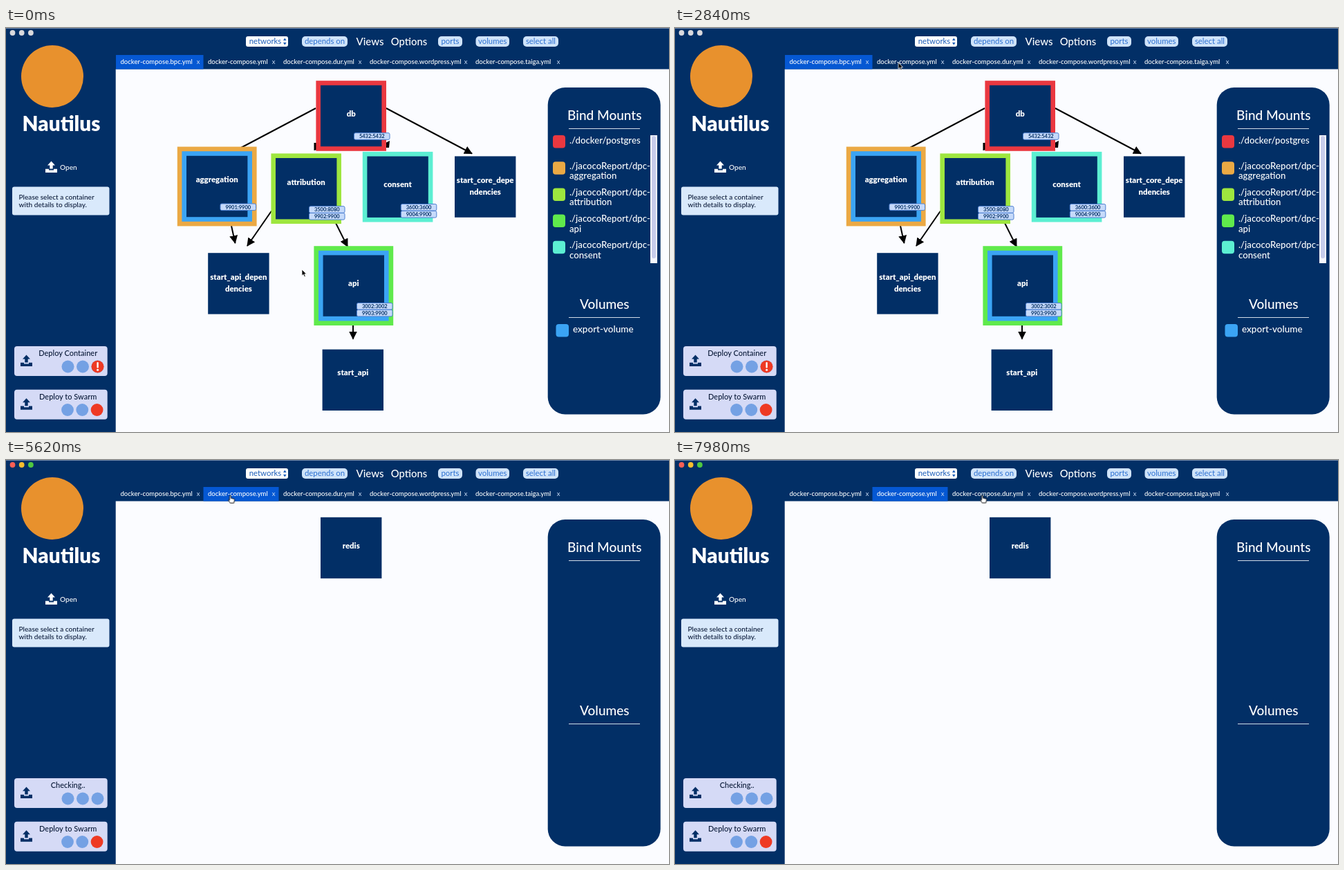
Write an HTML page that moves like this. It is 959 by 584 pixels and loops after 8 s.

```html
<!DOCTYPE html>
<html lang="en">
<head>
<meta charset="utf-8">
<title>Compose viewer</title>
<style>
  html, body { margin: 0; width: 100%; height: 100%; overflow: hidden; background: #fbfcff; }
  svg { display: block; width: 959px; height: 584px; font-family: Lato, "Open Sans", sans-serif; }
  text { white-space: pre; }
</style>
</head>
<body>
<svg id="stage" viewBox="0 0 959 584">
  <defs>
    <marker id="head" markerUnits="userSpaceOnUse" markerWidth="13" markerHeight="13" refX="11" refY="6" orient="auto">
      <path d="M0 0L12 6L0 12z"/>
    </marker>
  </defs>
</svg>
<script>
const LOOP = 8000, TAB_SWITCH = 5060, GRAPH_SWITCH = 5100, FOCUS = 3500;
const NAVY = '#022f66', INK = '#0a1a38', WHITE = '#fff', RED = '#ea3840', ORANGE = '#eba944', LIME = '#9ee63f',
  GREEN = '#60ea4c', AQUA = '#5cefd2', BLUE = '#3ba4f4', ALERT = '#ee3a24', IDLE = '#74a1e4';
const stage = document.getElementById('stage');

function add(parent, tag, attrs = {}, content) {
  const el = document.createElementNS('http://www.w3.org/2000/svg', tag);
  for (const key in attrs) el.setAttribute(key, attrs[key]);
  if (content) el.textContent = content;
  return parent.appendChild(el);
}
const group = (parent = stage) => add(parent, 'g');
const rect = (p, x, y, width, height, fill, rx = 0, more = {}) =>
  add(p, 'rect', { x, y, width, height, fill, rx, ...more });
const dot = (p, cx, cy, r, fill) => add(p, 'circle', { cx, cy, r, fill });
const text = (p, x, y, size, content, fill = WHITE, weight = 500, anchor = 'start') =>
  add(p, 'text', { x, y, 'font-size': size, fill, 'font-weight': weight, 'text-anchor': anchor }, content);
const centered = (p, x, y, size, content, fill, weight) => text(p, x, y, size, content, fill, weight, 'middle');
const path = (p, d, attrs) => add(p, 'path', { d, ...attrs });

// Shows an element only inside the given [from, to) spans of the loop.
function showDuring(el, ...spans) {
  const visible = t => spans.some(([from, to]) => t >= from && t < to);
  const times = [...new Set([0, ...spans.flat(), LOOP])].sort((a, b) => a - b);
  el.animate(times.map(t => ({
    offset: t / LOOP, visibility: visible(t) ? 'visible' : 'hidden', easing: 'step-end'
  })), { duration: LOOP, iterations: Infinity });
}

// Window frame
rect(stage, 0, 0, 959, 584, '#fbfcff');
rect(stage, 0, 0, 158.7, 584, NAVY);
rect(stage, 158, 0, 801, 59.5, NAVY);
rect(stage, 0, 0, 959, 1, '#7088aa');

function lights(colors) {
  const g = group();
  colors.forEach((c, i) => dot(g, 9.5 + 13.2 * i, 7, 3.9, c));
  return g;
}
showDuring(lights(['#d9d9dd', '#d9d9dd', '#d9d9dd']), [0, FOCUS]);
showDuring(lights(['#f95f55', '#f9bd2e', '#4fc840']), [FOCUS, LOOP]);

// Sidebar
function uploadIcon(p, x, y, fill) {
  path(p, 'M8.5 0L14 6H10.7V11H6.3V6H3zM0 11.3H5V13H12V11.3H17V16.5H0z',
    { fill, transform: `translate(${x} ${y})` });
}
dot(stage, 67, 70, 45, '#e8912d');
centered(stage, 80, 148.5, 29.7, 'Nautilus', WHITE, 900);
uploadIcon(stage, 57, 192.5, WHITE);
text(stage, 78, 204.5, 10.1, 'Open');
rect(stage, 9, 229.5, 140.5, 41, '#d9e9fb', 3);
text(stage, 18.5, 247.5, 10.1, 'Please select a container', INK);
text(stage, 18.5, 258.8, 10.1, 'with details to display.', INK);

function deployButton(y) {
  rect(stage, 12, y, 134.7, 43, '#d5daf6', 4);
  uploadIcon(stage, 21, y + 12.5, NAVY);
}
deployButton(460);
deployButton(522.8);
const label = (p, y, content) => centered(p, 89.7, y, 11, content, INK);
for (const x of [89.5, 111, 132.5]) dot(stage, x, 489.5, 9, IDLE);
const ready = group(), checking = group();
label(ready, 474, 'Deploy Container');
dot(ready, 132.5, 489.5, 9, ALERT);
rect(ready, 131.4, 483, 2.4, 8.5, WHITE, 1);
dot(ready, 132.6, 494.3, 1.5, WHITE);
label(checking, 474, 'Checking..');
label(stage, 537, 'Deploy to Swarm');
[IDLE, IDLE, ALERT].forEach((c, i) => dot(stage, 89 + 21.3 * i, 552, 8.9, c));

// Toolbar
const toolbar = [[347, 61, 'networks', 375], [428, 66, 'depends on'], [625, 35, 'ports'],
  [679.5, 48.5, 'volumes'], [748, 51, 'select all']];
for (const [x, w, name, mid] of toolbar) {
  rect(stage, x, 12, w, 15, mid ? WHITE : '#cfe3fa', mid ? 3 : 5);
  centered(stage, mid || x + w / 2, 23, 11.4, name, mid ? '#1b5cb8' : '#2c70d0', 400);
}
path(stage, 'M401 18L403.3 14.5L405.6 18zM401 21L403.3 24.5L405.6 21z', { fill: '#1b5cb8' });
centered(stage, 526.5, 24.5, 15, 'Views');
centered(stage, 583, 24.5, 14.8, 'Options');

// Tabs
showDuring(rect(stage, 159, 39, 126.5, 20.5, '#0558d3'), [0, TAB_SWITCH]);
showDuring(rect(stage, 285.5, 39, 109, 20.5, '#0558d3'), [TAB_SWITCH, LOOP]);
const tabs = [[165.5, 278, '.bpc'], [292, 387, ''], [401, 512, '.dur'], [526, 665, '.wordpress'], [679, 799, '.taiga']];
for (const [x, close, name] of tabs) {
  text(stage, x, 52, 9.55, `docker-compose${name}.yml`);
  centered(stage, close, 52, 9.5, 'x', '#c6d8f2', 400);
}

// Graphs
const NODE = 88.4;
const graph = group(), single = group();
function arrow(x1, y1, x2, y2, head = true) {
  add(graph, 'line', { x1, y1, x2, y2, stroke: '#000', 'stroke-width': 2, ...(head && { 'marker-end': 'url(#head)' }) });
}
function node(p, x, y, lines, dy, rings = [], ports = []) {
  rings.forEach((color, i) => {
    const pad = 6.6 * (rings.length - i);
    rect(p, x - pad, y - pad, NODE + 2 * pad, NODE + 2 * pad, color);
  });
  rect(p, x, y, NODE, NODE, NAVY);
  lines.forEach((line, i) => centered(p, x + NODE / 2, y + dy + 17.3 * i, 11.4, line, WHITE, 900));
  ports.forEach(([px, py, port]) => {
    rect(p, px, py, 51.5, 9.6, '#c6dafa', 2, { stroke: '#4c7fd0', 'stroke-width': 1 });
    centered(p, px + 25.8, py + 7.6, 7.5, port, NAVY, 700);
  });
}
arrow(448, 116, 340, 173, false);
arrow(550, 116, 674, 181.5);
arrow(326, 286, 331.5, 311);
arrow(384, 264.5, 349, 315);
arrow(477, 282, 494, 316);
arrow(502, 430, 502, 449.5);
path(graph, 'M445.5 166H450V176L445.5 177zM549 166L555 163L554 173H549z', {});
node(graph, 455, 82.8, ['db'], 45.2, [RED], [[503.5, 151.7, '5432:5432']]);
node(graph, 261, 184.8, ['aggregation'], 38.4, [ORANGE, BLUE], [[310, 254, '9901:9900']]);
node(graph, 390, 188, ['attribution'], 38.7, [LIME], [[438.5, 257.7, '3500:8080'], [438.5, 267.5, '9902:9900']]);
node(graph, 522.4, 185.5, ['consent'], 44.5, [AQUA], [[571.3, 254.5, '3600:3600'], [571.3, 264.5, '9004:9900']]);
node(graph, 649, 185.4, ['start_core_depe', 'ndencies'], 38.4);
node(graph, 292.2, 325.2, ['start_api_depen', 'dencies'], 38.4);
node(graph, 458.6, 328.4, ['api'], 44.8, [GREEN, BLUE], [[507.5, 397.5, '3002:3002'], [507.5, 407.3, '9903:9900']]);
node(graph, 457.6, 464.6, ['start_api'], 37.8);
node(single, 455, 82.8, ['redis'], 45);

// Legend
rect(stage, 783.7, 86, 163, 472.4, NAVY, 25);
const full = group(), empty = group();
function heading(p, y, title) {
  centered(p, 865.8, y, 19, title);
  rect(p, 814, y + 12, 103, 1, '#d3dce8');
}
heading(stage, 133, 'Bind Mounts');
heading(full, 406, 'Volumes');
heading(empty, 369, 'Volumes');
const report = './jacocoReport/dpc-';
const mounts = [[RED, './docker/postgres'], [ORANGE, report, 'aggregation'], [LIME, report, 'attribution'],
  [GREEN, report, 'api'], [AQUA, report, 'consent']];
mounts.forEach(([color, first, second], i) => {
  const y = 155 + 38.2 * i;
  rect(full, 791, y, 18, 18.5, color, 4);
  text(full, 815, second ? y + 10.5 : y + 12, 13.2, first);
  if (second) text(full, 815, y + 25, 13.2, second);
});
rect(full, 932, 155, 10, 185, '#f6f7fd');
rect(full, 934, 156, 6, 177, '#c8cdec', 3);
rect(full, 795.5, 428, 18.5, 18.5, BLUE, 4);
text(full, 820, 440, 13.5, 'export-volume');

showDuring(full, [0, TAB_SWITCH]);
showDuring(empty, [TAB_SWITCH, LOOP]);
for (const el of [graph, ready]) showDuring(el, [0, GRAPH_SWITCH]);
for (const el of [single, checking]) showDuring(el, [GRAPH_SWITCH, LOOP]);

// Pointer
const cursor = group();
const pointer = path(cursor, 'M0 0V9.2L2.1 7.3L3.7 10.8L5.3 10.1L3.8 6.8H6.6z',
  { fill: '#000', stroke: WHITE, 'stroke-width': 0.8 });
const hand = path(cursor, 'M-1 1.2Q0 -.2 1 1.2V4.6L5.3 5.4Q6.4 5.8 6.2 7.2L5.2 11.5H-.2L-2.9 7.4Q-2.7 6 -1 7.4z',
  { fill: WHITE, stroke: '#000', 'stroke-width': 0.9 });
showDuring(pointer, [0, 4300], [5800, 7640]);
showDuring(hand, [4300, 5800], [7640, LOOP]);
const stops = [[0, 428, 349], [580, 428, 349], [1300, 296, 73], [1540, 296, 73], [2100, 323, 50],
  [5500, 323, 50], [6240, 349, 62], [7280, 349, 62], [7900, 444.5, 50.5], [LOOP, 444.5, 50.5]];
cursor.animate(stops.map(([t, x, y]) => ({
  offset: t / LOOP, transform: `translate(${x}px, ${y}px)`, easing: 'ease-in-out'
})), { duration: LOOP, iterations: Infinity });
</script>
</body>
</html>
```
